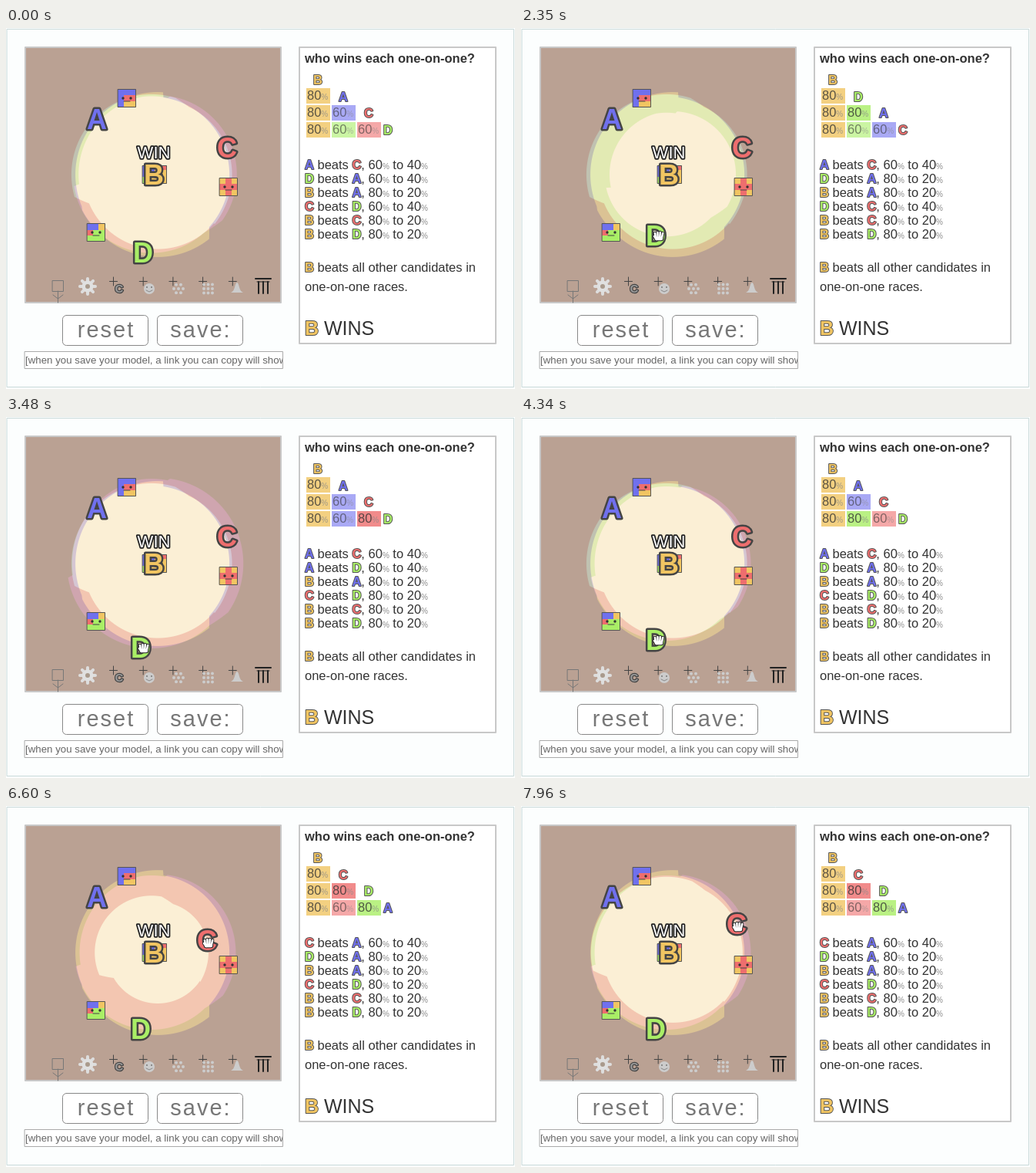
An HTML page with a canvas for the animation above (8000 ms loop, 661 by 468 pixels).

```html
<!DOCTYPE html>
<html lang="en">
<head>
<meta charset="utf-8">
<title>One-on-one races</title>
<style>
html, body { margin: 0; height: 100%; overflow: hidden; background: #fcfefe; }
canvas { display: block; }
</style>
</head>
<body>
<canvas id="stage" width="661" height="468"></canvas>
<script>
const ctx = document.getElementById('stage').getContext('2d');
const LOOP = 8000, INK = '#333', SANS = '"Liberation Sans", Arial, sans-serif';
const COLORS = { A: '#7070ee', B: '#f1c562', C: '#ee6e6e', D: '#a9ee66' };
// Each candidate multiplies this tint onto every spot it would beat.
const TINTS = { A: [.85, .83, .99], B: [.984, .937, .835], C: [.97, .83, .83], D: [.9, .98, .84] };
const VOTERS = [[157, 91], [289, 206], [117, 265], [189, 190], [197, 190]];
const ARENA = { x: 26, y: 26, w: 330, h: 329 };

// Bursts of movement: start, end, number of steps.
const BURSTS = [[700, 1660, 8], [1790, 1790, 1], [2060, 3060, 8], [3210, 3480, 3], [3900, 4340, 4],
  [4620, 5600, 7], [5760, 6750, 7], [6910, 7560, 6], [7830, 7960, 2]];
const D_PATH = [[1790, 178, 291], [2060, 177, 287], [2346, 175, 269], [2630, 175, 258], [3060, 175, 289],
  [3480, 175, 299], [3900, 175, 297], [4340, 175, 289]];
const C_PATH = [[5600, 287, 155], [6585, 261, 174], [6750, 258, 176], [7560, 287, 153], [7830, 284, 153], [7960, 280, 153]];
const MOUSE_PATH = [[700, 182, 405], [974, 206, 345], [1111, 206, 319], [1386, 194, 300], [1660, 180, 289],
  [4620, 179, 289], [5273, 288, 158]];

function stepTime(t) {
  let last = 0;
  for (const [start, end, n] of BURSTS) {
    if (t < start) break;
    const gap = (end - start) / (n - 1) || 1;
    last = start + gap * Math.min(n - 1, Math.floor((t - start) / gap + 1e-6));
  }
  return last;
}

function along(path, t) {
  const i = path.findIndex(k => k[0] > t);
  if (i < 1) return (i ? path[path.length - 1] : path[0]).slice(1);
  const [a, b] = [path[i - 1], path[i]], f = (t - a[0]) / (b[0] - a[0]);
  return [a[1] + f * (b[1] - a[1]), a[2] + f * (b[2] - a[2])];
}

const dist = (p, q) => Math.sqrt((p[0] - q[0]) ** 2 + (p[1] - q[1]) ** 2);
const { min, max } = Math;
function median(a, b, c, d, e) {
  const lo = max(min(a, b), min(c, d)), hi = min(max(a, b), max(c, d));
  return max(min(lo, hi), min(e, max(lo, hi)));
}

function drawRegions(cands) {
  const img = ctx.createImageData(ARENA.w, ARENA.h);
  const layers = Object.keys(cands).map(k => [TINTS[k], VOTERS.map(v => dist(v, cands[k]))]);
  for (let y = 0, o = 0; y < ARENA.h; y++) for (let x = 0; x < ARENA.w; x++, o += 4) {
    const p = [x + ARENA.x + .5, y + ARENA.y + .5];
    const [a, b, c, d, e] = VOTERS.map(v => dist(v, p));
    let rgb = [255, 255, 255];
    for (const [tint, r] of layers) {
      // Positive when most voters are nearer the candidate than this spot.
      const edge = median(a - r[0], b - r[1], c - r[2], d - r[3], e - r[4]);
      const loss = min(1, max(0, edge + .5));
      for (let i = 0; i < 3; i++) rgb[i] *= 1 - loss * (1 - tint[i]);
    }
    img.data.set([rgb[0], rgb[1], rgb[2], 255], o);
  }
  ctx.putImageData(img, ARENA.x, ARENA.y);
}

function rect(x, y, w, h, color) { ctx.fillStyle = color; ctx.fillRect(x, y, w, h); }
function frame(x, y, w, h, color, line) {
  ctx.strokeStyle = color; ctx.lineWidth = line;
  ctx.strokeRect(x + line / 2, y + line / 2, w - line, h - line);
}
function dot(x, y, r, color) {
  ctx.fillStyle = color; ctx.beginPath(); ctx.arc(x, y, r, 0, 7); ctx.fill();
}
function lines(paths, color, width) {
  ctx.strokeStyle = color; ctx.lineWidth = width; ctx.beginPath();
  for (const [first, ...rest] of paths) { ctx.moveTo(...first); rest.forEach(p => ctx.lineTo(...p)); }
  ctx.stroke();
}
function text(str, x, y, size, color = INK, weight = '', outline = 0, edge = '#444') {
  ctx.font = `${weight} ${size}px ${SANS}`;
  if (outline) { ctx.strokeStyle = edge; ctx.lineWidth = outline; ctx.strokeText(str, x, y); }
  ctx.fillStyle = color; ctx.fillText(str, x, y);
  return ctx.measureText(str).width;
}
function centered(str, x, y, ...style) {
  ctx.textAlign = 'center'; text(str, x, y, ...style); ctx.textAlign = 'left';
}
// Running text: candidate letters are coloured, percent signs small.
function rich(str, x, y, size = 16.5) {
  for (const part of str.split(/([ABCD%])/)) {
    if (COLORS[part]) x += text(part, x, y, size, COLORS[part], 'bold', 2, '#555');
    else if (part === '%') x += text(part, x, y, 10, '#888');
    else x += text(part, x, y, size);
  }
}

function drawPage(hoverReset) {
  rect(0, 0, 661, 468, '#fcfefe');
  frame(1, 1, 659, 465, '#c8d8d8', 1);
  frame(24, 24, 334, 333, '#c8c8c8', 2);
  rect(380, 24, 257, 386, '#fff');
  frame(380, 24, 257, 386, '#c8c8c8', 2);
  ctx.letterSpacing = '2px';
  [['reset', 73], ['save:', 196]].forEach(([label, x], i) => {
    ctx.beginPath(); ctx.roundRect(x + .5, 372.5, 111, 39, 5);
    ctx.fillStyle = !i && hoverReset ? '#eee' : '#fff'; ctx.fill();
    ctx.strokeStyle = '#888'; ctx.lineWidth = 1; ctx.stroke();
    centered(label, x + 57, 401, 29, '#777');
  });
  ctx.letterSpacing = '0px';
  rect(24, 419, 336, 23, '#fff');
  frame(24, 419, 336, 23, '#aaa', 1);
  ctx.save();
  ctx.beginPath(); ctx.rect(25, 420, 334, 21); ctx.clip();
  text('[when you save your model, a link you can copy will show', 25, 435, 13.3, '#666');
  ctx.restore();
}

function drawTools() {
  frame(60, 327, 15, 15, '#777', 1);
  lines([[[67.5, 341], [67.5, 356]], [[61, 346], [67.5, 351], [74, 346]]], '#777', 1);
  for (let i = 0; i < 8; i++) {
    const a = i * Math.PI / 4;
    lines([[[106, 335], [106 + 10 * Math.cos(a), 335 + 10 * Math.sin(a)]]], '#ddd', 4);
  }
  dot(106, 335, 7.5, '#e0e0e0'); dot(106, 335, 3, '#a99a8c');
  for (let i = 0; i < 5; i++) {
    const x = 139.5 + i * 38.7;
    lines([[[x - 5, 328.5], [x + 5, 328.5]], [[x, 323], [x, 334]]], '#444', 1);
  }
  centered('C', 147, 343, 15, '#999', 'bold', 2.5);
  dot(186, 338, 7, '#ccc');
  dot(183, 336, 1, '#777'); dot(189, 336, 1, '#777');
  lines([[[182, 340], [186, 342], [190, 340]]], '#888', 1);
  dot(224, 338, 2, '#ccc');
  for (let i = 0; i < 6; i++) dot(224 + 6 * Math.cos(i * 1.047), 338 + 6 * Math.sin(i * 1.047), 2, '#ccc');
  for (let i = 0; i < 9; i++) dot(257 + i % 3 * 5.5, 332.5 + Math.floor(i / 3) * 5.5, 2, '#ccc');
  ctx.fillStyle = '#ccc'; ctx.beginPath(); ctx.moveTo(292, 343);
  ctx.bezierCurveTo(298, 341, 297, 330, 300, 330);
  ctx.bezierCurveTo(303, 330, 302, 341, 308, 343); ctx.fill();
  lines([[[324, 325], [344, 325]], ...[328, 334, 340].map(x => [[x, 329], [x, 344]])], '#222', 2);
  lines([[[326, 329], [342, 329]]], '#222', 1);
}

function face([x, y], base, ...patches) {
  rect(x - 12, y - 12, 24, 24, COLORS[base]);
  for (const [key, px, py, w, h] of patches) rect(x - 12 + px, y - 12 + py, w, h, COLORS[key]);
  frame(x - 12, y - 12, 24, 24, '#555', 1);
  dot(x - 5, y, 1.7, '#333'); dot(x + 5, y, 1.7, '#333');
  lines([[[x - 4, y + 4], [x + 4, y + 4]]], '#444', 1);
}

function drawVoters() {
  face(VOTERS[3], 'B', ['A', 0, 0, 8, 15], ['D', 0, 15, 10, 9]);
  face(VOTERS[4], 'B', ['C', 8, 0, 16, 6], ['A', 0, 0, 8, 10]);
  face(VOTERS[0], 'A', ['C', 8, 8, 16, 8], ['B', 8, 16, 16, 8]);
  face(VOTERS[1], 'B', ['C', 0, 8, 24, 8], ['C', 8, 0, 8, 24]);
  face(VOTERS[2], 'D', ['A', 0, 0, 15, 9], ['B', 15, 0, 9, 9], ['C', 0, 9, 8, 7]);
}

function duel(cands, a, b) {
  const votes = VOTERS.filter(v => dist(v, cands[a]) < dist(v, cands[b])).length;
  return votes > 2 ? { win: a, lose: b, pct: votes * 20 } : { win: b, lose: a, pct: 100 - votes * 20 };
}

function drawResults(cands) {
  const names = [...'ABCD'];
  const wins = n => names.filter(m => m !== n && duel(cands, n, m).win === n).length;
  const rank = names.sort((a, b) => wins(b) - wins(a) || (a < b ? -1 : 1));
  text('who wins each one-on-one?', 388, 45, 16.5, INK, 'bold');
  rank.forEach((name, i) => {
    centered(name, i < 3 ? 405 + i * 33 : 496, 73 + i * 21.6, 16.5, COLORS[name], 'bold', 2, '#555');
    for (let j = 0; j < i; j++) {
      const { win, pct } = duel(cands, rank[j], name), x = 390 + j * 33, y = 56 + i * 22;
      ctx.globalAlpha = pct / 100;
      rect(x, y, 31, 20, COLORS[win]);
      rich(pct + '%', x + 1, y + 15);
      ctx.globalAlpha = 1;
    }
  });
  ['AC', 'AD', 'AB', 'CD', 'CB', 'DB'].forEach((pair, i) => {
    const { win, lose, pct } = duel(cands, ...pair);
    rich(`${win} beats ${lose}, ${pct}% to ${100 - pct}%`, 388, 183 + i * 18);
  });
  rich(rank[0] + ' beats all other candidates in', 388, 316);
  rich('one-on-one races.', 388, 341);
  rich(rank[0] + ' WINS', 388, 398, 25);
}

function drawArrow(x, y) {
  const shape = [[0, 0], [0, 25], [6, 20], [10, 30], [14, 28], [10, 18], [17, 17]];
  ctx.beginPath();
  shape.forEach(([dx, dy]) => ctx.lineTo(x + dx, y + dy));
  ctx.closePath();
  ctx.strokeStyle = '#fff'; ctx.lineWidth = 2; ctx.stroke();
  ctx.fillStyle = '#000'; ctx.fill();
}

function drawHand(x, y, open) {
  const tops = open ? [-6, -8, -8, -5] : [-3, -4, -4, -3];
  const strokes = tops.map((top, i) => [[x - 4 + i * 3.4, y + top], [x - 3 + i * 2.6, y + 3]]);
  strokes.push([[x - (open ? 7 : 5), y + 1], [x - 2, y + 5]]);
  const palm = [[[x - 2, y + 4], [x + 4, y + 4]]];
  lines(strokes, '#222', 4.4); lines(palm, '#222', open ? 8.5 : 6.5);
  lines(strokes, '#fff', 2.6); lines(palm, '#fff', open ? 6.5 : 4.5);
}

function drawMouse(t, cands) {
  if (t < 700) return;
  const dragD = t >= 1790 && t < 4620, dragC = t >= 5600;
  let [x, y] = along(MOUSE_PATH, t);
  if (dragD) [x, y] = [cands.D[0] + 3, cands.D[1]];
  if (dragC) [x, y] = [cands.C[0] + 1, cands.C[1] + 3];
  const over = Object.values(cands).some(c => dist(c, [x, y]) < 15);
  if (over) drawHand(x, y, !dragD && !dragC); else drawArrow(x, y);
}

function render(t) {
  const cands = { A: [118, 118], C: along(C_PATH, t), D: along(D_PATH, t), B: [192, 190] };
  ctx.lineJoin = ctx.lineCap = 'round';
  drawPage(t >= 700 && t < 800);
  drawRegions(cands);
  drawTools();
  drawVoters();
  for (const [name, [x, y]] of Object.entries(cands)) {
    centered(name, x, y + 13, 36, COLORS[name], 'bold', 5);
  }
  centered('WIN', 192, 169, 22, '#fff', '', 3.5, '#222');
  drawResults(cands);
  drawMouse(t, cands);
}

let shown = -1;
function tick(now) {
  const t = stepTime(now % LOOP);
  if (t !== shown) render(shown = t);
  requestAnimationFrame(tick);
}
requestAnimationFrame(tick);
</script>
</body>
</html>
```
